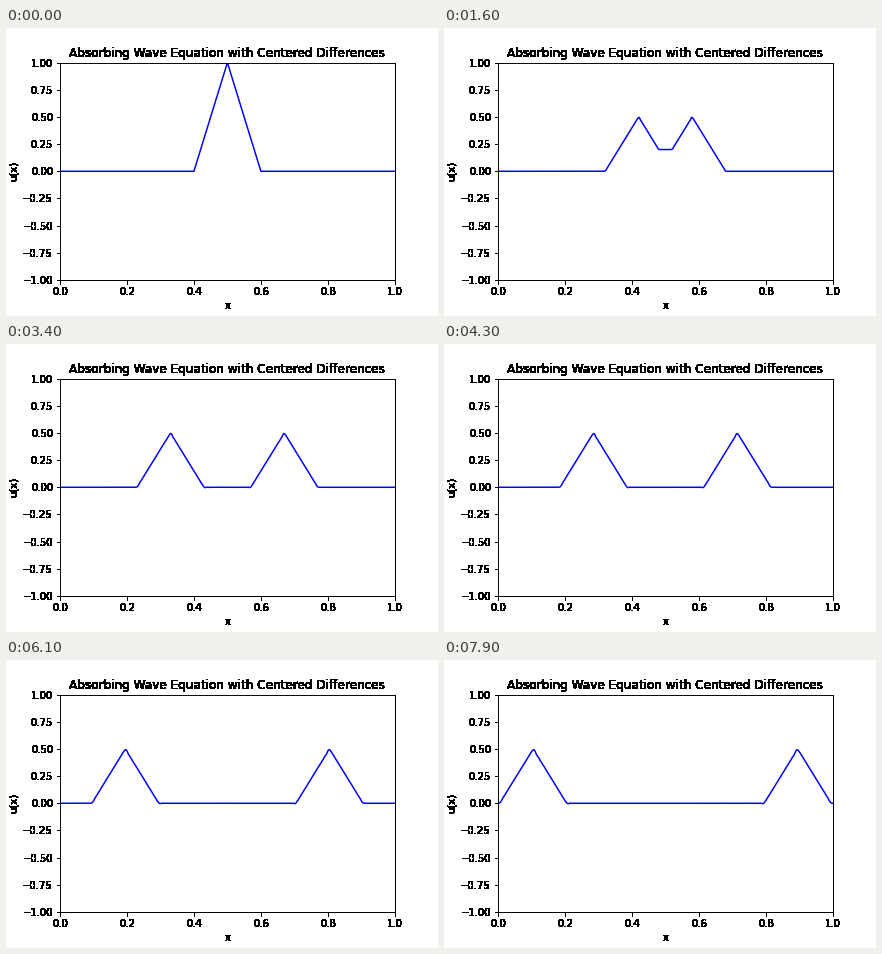
A matplotlib script for the animation above (8 s loop, 432 px wide and 288 px high).

```python
import numpy as np
import matplotlib.pyplot as plt
from matplotlib.animation import FuncAnimation

plt.rcParams["font.family"] = "DejaVu Sans"
plt.rcParams["font.size"] = 10

FRAMES = 80
STEPS = 10          # time steps per frame
CELLS = 1000
COURANT = 0.5       # c * dt / dx


def solve(x):
    """Leapfrog wave solution with absorbing ends, one row per frame."""
    c2 = COURANT ** 2
    mur = (COURANT - 1) / (COURANT + 1)

    def lap(u):
        return u[2:] - 2 * u[1:-1] + u[:-2]

    old = np.maximum(0, 1 - np.abs(x - 0.5) / 0.1)
    rows = [old]
    u = old.copy()
    u[1:-1] += 0.5 * c2 * lap(old)
    for step in range(1, (FRAMES - 1) * STEPS + 1):
        if step % STEPS == 0:
            rows.append(u)
        new = np.empty_like(u)
        new[1:-1] = 2 * u[1:-1] - old[1:-1] + c2 * lap(u)
        new[0] = u[1] + mur * (new[1] - u[0])
        new[-1] = u[-2] + mur * (new[-2] - u[-1])
        old, u = u, new
    return rows


fig = plt.figure(figsize=(6, 4), dpi=72)
ax = fig.add_axes([0.125, 0.125, 0.775, 0.755])
ax.set(xlim=(0, 1), ylim=(-1, 1), xlabel="x", ylabel="u(x)",
       title="Absorbing Wave Equation with Centered Differences")
ax.set_xticks(np.linspace(0, 1, 6))
ax.set_yticks(np.linspace(-1, 1, 9))

# Draw the labels on a clear page and drop the alpha: hard, heavy lettering.
fig.set_facecolor((1, 1, 1, 0))
fig.canvas.draw()
page = np.asarray(fig.canvas.buffer_rgba())[..., :3].copy()
fig.set_facecolor("white")
fig.figimage(page, zorder=-1)
ax.set_title("")
ax.patch.set_visible(False)
ax.xaxis.set_visible(False)
ax.yaxis.set_visible(False)

x = np.linspace(0, 1, CELLS + 1)
waves = solve(x)
line, = ax.plot(x, waves[0], color="blue", lw=1.5)


def update(i):
    line.set_ydata(waves[i])
    return line,


anim = FuncAnimation(fig, update, frames=FRAMES, interval=100,
                     repeat=True, repeat_delay=0)
plt.show()
```
